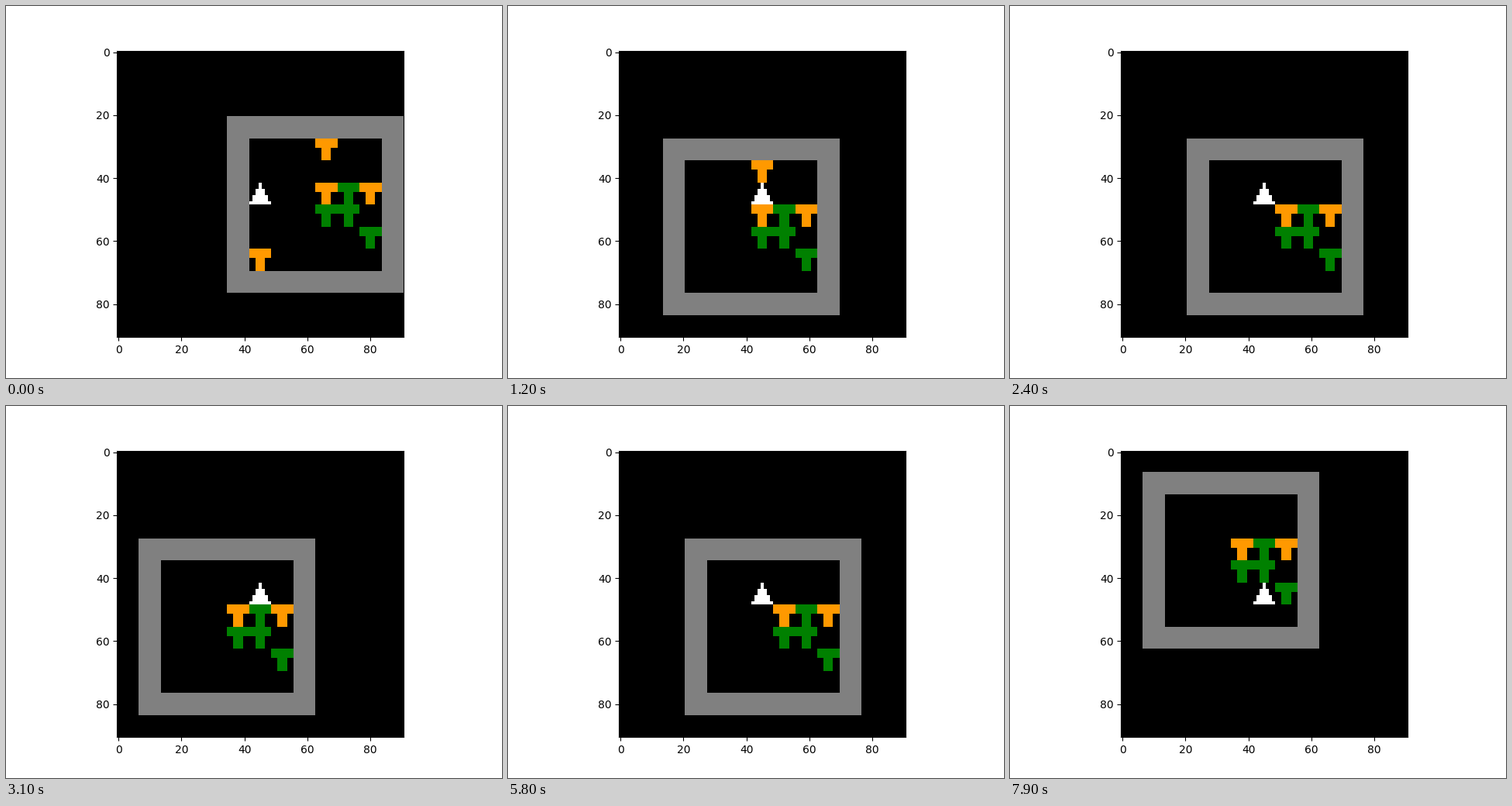
Animation, 640 px wide and 480 px high, one loop 8000 ms. Source, as a matplotlib script:

```python
import numpy as np
import matplotlib.pyplot as plt
from matplotlib.animation import FuncAnimation

CELL = 7          # sprite size in grid pixels
VIEW = 13         # cells shown along each side
MID = VIEW // 2   # the player always stands in the middle cell
ROOM = 6          # inner room size in cells
FRAMES, STEP_MS = 80, 100

WHITE = (255, 255, 255)
GRAY = (128, 128, 128)
ORANGE = (255, 153, 0)
GREEN = (0, 128, 0)

# (column, row) inside the room
FRUIT = [(3, 0), (3, 2), (5, 2), (0, 5)]
TREES = [(4, 2), (3, 3), (4, 3), (5, 4)]

START = (0, 2)
DIRS = {"U": (0, -1), "D": (0, 1), "L": (-1, 0), "R": (1, 0)}
# first step of each walk and its moves, one per step
WALKS = {1: "DDDURURU", 11: "URURD", 18: "L", 20: "LLDRULURRD", 31: "R",
         39: "LR", 42: "LR", 46: "U", 48: "D", 55: "ULLDD", 63: "DDRRL",
         69: "R", 71: "L", 74: "LR", 77: "RLR"}


def walk_path():
    moves = {first + k: DIRS[m]
             for first, run in WALKS.items() for k, m in enumerate(run)}
    path = [START]
    for i in range(1, FRAMES):
        dx, dy = moves.get(i, (0, 0))
        x, y = path[-1]
        path.append((x + dx, y + dy))
    return path


def tee_mask():
    mask = np.zeros((CELL, CELL), bool)
    mask[:3] = True
    mask[3:, 2:5] = True
    return mask


def player_mask():
    row, col = np.indices((CELL, CELL))
    return np.abs(col - CELL // 2) <= row // 2


PATH = walk_path()
TEE = tee_mask()
PLAYER = player_mask()


def stamp(img, mask, col, row, color):
    y, x = row * CELL, col * CELL
    img[y:y + CELL, x:x + CELL][mask] = color


def render(i):
    img = np.zeros((VIEW * CELL, VIEW * CELL, 3), np.uint8)
    px, py = PATH[i]
    ox, oy = MID - px, MID - py

    def fill(first, last, color):
        img[(oy + first) * CELL:(oy + last) * CELL,
            (ox + first) * CELL:(ox + last) * CELL] = color

    fill(-1, ROOM + 1, GRAY)
    fill(0, ROOM, 0)

    eaten = set(PATH[:i + 1])
    for x, y in FRUIT:
        if (x, y) not in eaten:
            stamp(img, TEE, ox + x, oy + y, ORANGE)
    for x, y in TREES:
        stamp(img, TEE, ox + x, oy + y, GREEN)
    stamp(img, PLAYER, MID, MID, WHITE)
    return img


fig, ax = plt.subplots(figsize=(6.4, 4.8), dpi=100)
view = ax.imshow(render(0))


def update(i):
    view.set_data(render(i))
    return [view]


anim = FuncAnimation(fig, update, frames=FRAMES, interval=STEP_MS,
                     repeat=True, repeat_delay=0)
plt.show()
```
